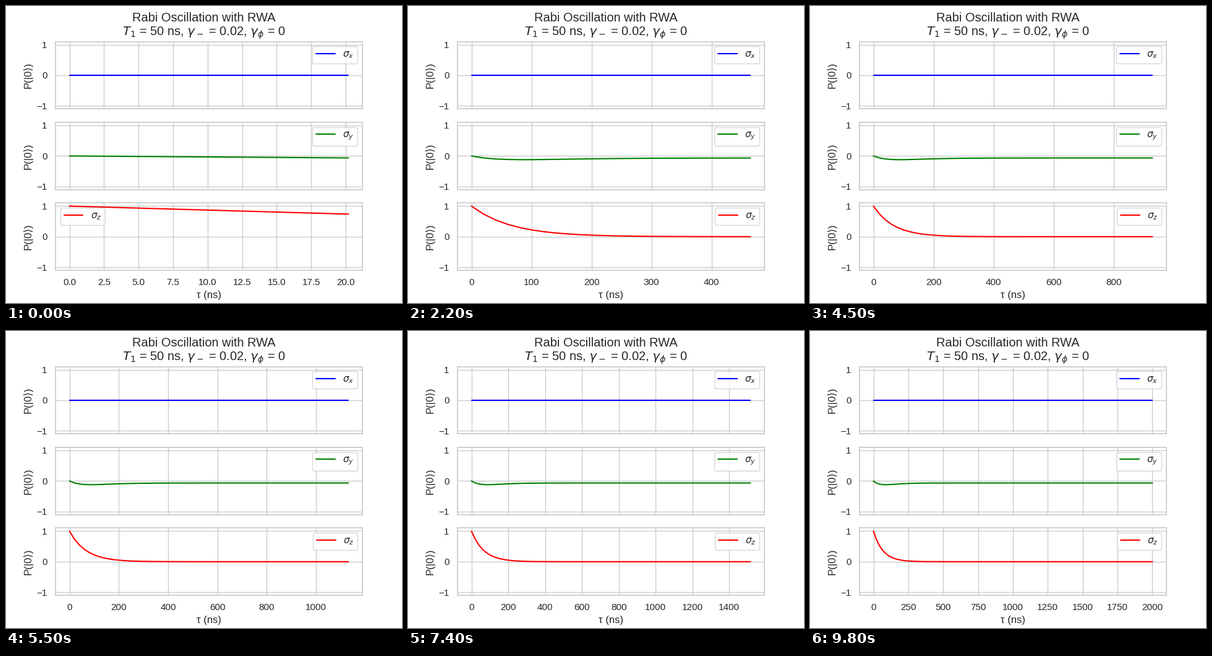
A matplotlib script that plays this animation: 640x480 px, repeating every 9900 ms.

```python
import numpy as np
import matplotlib.pyplot as plt
from matplotlib.animation import FuncAnimation

INK, LIGHT = "0.15", "0.8"

plt.rcParams.update({
    "font.family": ["Liberation Sans", "DejaVu Sans"],
    "font.size": 12,
    "mathtext.fontset": "dejavusans",
    "text.color": INK,
    "axes.labelcolor": INK,
    "axes.labelsize": 12,
    "axes.edgecolor": LIGHT,
    "axes.linewidth": 1.25,
    "axes.axisbelow": True,
    "axes.grid": True,
    "grid.color": LIGHT,
    "grid.linewidth": 1,
    "grid.linestyle": "-",
    "lines.linewidth": 1.5,
    "lines.solid_capstyle": "round",
    "legend.fontsize": 11,
    "xtick.color": INK,
    "ytick.color": INK,
    "xtick.labelsize": 11,
    "ytick.labelsize": 11,
    "xtick.major.size": 6,
    "ytick.major.size": 6,
    "xtick.bottom": False,
    "ytick.left": False,
})

# Damped spin components, sampled coarsely over 2 microseconds
STEPS = 100
RATE = 0.015
Y_END = -0.065
t = np.linspace(0, 2000, STEPS)
decay = np.exp(-RATE * t)
sx = np.zeros(STEPS)
sy = Y_END + (-Y_END - 0.0031 * t) * decay
sz = decay

fig, axes = plt.subplots(3, 1, sharex=True, figsize=(6.4, 4.8), dpi=100)
fig.suptitle("Rabi Oscillation with RWA\n"
             r"$T_1$ = 50 ns, $\gamma_-$ = 0.02, $\gamma_\phi$ = 0",
             fontsize=14.4)

curves = []
for ax, values, name, color in zip(axes, (sx, sy, sz), "xyz",
                                   ("blue", "green", "red")):
    line, = ax.plot(t[:2], values[:2], color=color, label=rf"$\sigma_{name}$")
    ax.set_ylim(-1.1, 1.1)
    ax.set_yticks([-1, 0, 1])
    ax.set_ylabel("P(|0\u27e9)")
    ax.legend(loc="best")
    curves.append((line, values))
axes[-1].set_xlabel("τ (ns)")


def update(frame):
    n = frame + 2
    for line, values in curves:
        line.set_data(t[:n], values[:n])
    end = t[n - 1]
    axes[0].set_xlim(-0.05 * end, 1.05 * end)
    return [line for line, _ in curves]


anim = FuncAnimation(fig, update, frames=STEPS - 1, interval=100,
                     repeat=True, repeat_delay=0, blit=False)
plt.show()
```
